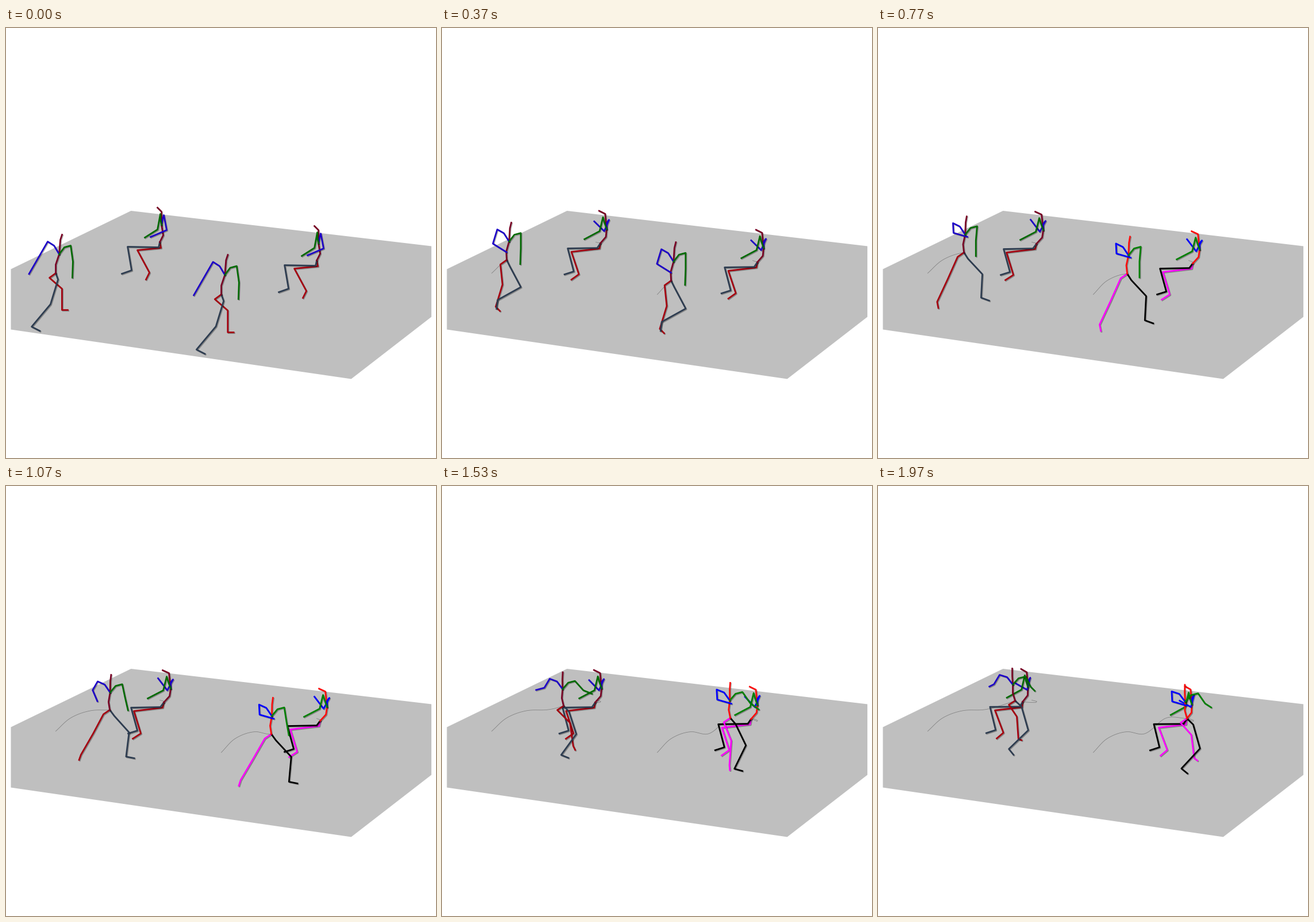
A matplotlib script for the animation above (2.01 s loop, 748x748 px).

```python
import numpy as np
import matplotlib.pyplot as plt
from matplotlib.animation import FuncAnimation
from matplotlib.patheffects import Normal, SimpleLineShadow

SIZE, DPI = 748, 88
PX = 72 / DPI
STEPS = 60          # poses per loop, 30 per second
SWITCH = 15         # pose at which the bright palette sets in
T = np.arange(STEPS)
KEYS = np.array([0, 11, 23, 32, 46, 59.0])

# right leg, left leg, spine, left arm, right arm
DARK = ["#a5000f", "#2d3c50", "#780023", "#1c00c8", "#006a00"]
BRIGHT = ["#ff00ff", "#000000", "#ff0d0d", "#0000ff", "#008000"]


def ease(u):
    u = np.clip(u, 0, 1)
    return u * u * (3 - 2 * u)


def spline(t, values):
    """Cubic Hermite curve through values at the key poses."""
    v = np.asarray(values, float)
    m = np.gradient(v, KEYS)
    i = np.clip(np.searchsorted(KEYS, t, "right") - 1, 0, len(KEYS) - 2)
    h = KEYS[i + 1] - KEYS[i]
    u = (t - KEYS[i]) / h
    return (v[i] + ease(u) * (v[i + 1] - v[i])
            + h * u * (1 - u) * ((1 - u) * m[i] - u * m[i + 1]))


def glide(points):
    return np.stack([spline(T, c) for c in zip(*points)], -1)


def swing(t, lengths, angles):
    """Bone turning through angles (90 is down) as it foreshortens."""
    r = np.interp(t, (0, 23, 59), lengths)
    a = np.radians(spline(t, angles))
    return np.stack([r * np.cos(a), r * np.sin(a)], -1)


def blend(weight, start, end):
    start, end = np.array(start, float), np.array(end, float)
    return start + np.asarray(weight)[:, None] * (end - start)


def chain(base, bones):
    return np.cumsum(np.stack([base, *bones], 1), axis=1)


def assemble(hip, right, left, spine, larm, rarm):
    back = chain(hip, spine)
    neck = back[:, 2]
    return hip, [chain(hip, right), chain(hip, left), back,
                 chain(neck, larm), chain(neck, rarm)]


def walker(path, scale=1, lag=0, arm_stop=STEPS):
    t = T - lag * ease((T - 23) / 25)
    ta = np.minimum(t, arm_stop)
    p = t / (STEPS - 1)
    right = [blend(p, (-11, 8), (-11, 7)),
             swing(t, (29, 42, 25), (41, 84, 114, 118, 45, 56)),
             swing(t, (37, 44, 39), (90, 107, 115, 120, 82, 86)),
             swing(t, (10, 11, 6), (0, 45, 79, 110, 64, 20))]
    left = [blend(p, (4, 11), (11, 10)),
            swing(t, (45, 37, 43), (107, 62, 47, 48, 72, 74)),
            swing(t, (51, 41, 47), (130, 151, 93, 97, 126, 136)),
            swing(t, (16, 15, 13), (27, 97, 20, 11, 22, 51))]
    spine = [blend(p, (0, -15), (-4, -13)), blend(p, (6, -18), (0, -15)),
             blend(p, (2, -25), (-1, -15)), blend(p, (3, -9), (0, -13))]
    larm = [blend(p, (-9, -15), (-10, -13)), blend(p, (-11, -7), (-13, -4)),
            swing(ta, (34, 17, 19), (120, 107, 87, 120, 121, 121)),
            swing(ta, (31, 25, 9), (120, 32, 16, 67, 165, 153))]
    rarm = [blend(p, (9, -12), (10, -11)), blend(p, (11, -3), (12, -3)),
            swing(t, (28, 25, 20), (82, 90, 95, 78, 48, 63)),
            swing(t, (28, 27, 10), (92, 92, 90, 77, 22, 45))]
    limbs = [[scale * bone for bone in limb]
             for limb in (right, left, spine, larm, rarm)]
    return assemble(glide(path), *limbs)


def sitter(path):
    lean = ease(T / 14) - 0.3 * ease((T - 38) / 21)

    def limb(upright, bent):
        return [blend(lean, a, b) for a, b in zip(upright, bent)]

    return assemble(
        glide(path),
        limb([(2, 10), (-41, 4), (21, 39), (-6, 12)],
             [(-2, 9), (-50, 6), (12, 39), (-14, 9)]),
        limb([(-2, 9), (-54, -1), (7, 41), (-17, 6)],
             [(-6, 8), (-51, 1), (11, 40), (-16, 5)]),
        limb([(6, -12), (-3, -18), (0, -23), (-7, -7)],
             [(10, -11), (2, -13), (-3, -27), (-11, -5)]),
        limb([(2, -10), (2, -7), (5, 26), (-28, 12)],
             [(0, -11), (4, -5), (-10, 19), (-16, -21)]),
        limb([(-2, -10), (0, -9), (-5, 27), (-22, 14)],
             [(-4, -11), (-3, -10), (-6, 24), (-27, 14)]))


fig = plt.figure(figsize=(SIZE / DPI, SIZE / DPI), dpi=DPI, facecolor="white")
ax = fig.add_axes([0, 0, 1, 1])
ax.set(xlim=(-0.5, SIZE - 0.5), ylim=(SIZE - 0.5, -0.5))
ax.axis("off")
ax.fill([8, 217, 739.5, 739.5, 600, 8], [419, 317.5, 379, 502, 610, 524],
        color="#bfbfbf", lw=0)

cast = [
    (sitter([(267, 372), (275, 374), (275, 375), (274, 376), (266, 376),
             (251, 375)]), False),
    (walker([(86, 426), (112, 403), (149, 390), (180, 389), (211, 382),
             (238, 373)]), False),
    (sitter([(540, 404), (548, 407), (547, 409), (546, 408), (537, 405),
             (536, 405)]), True),
    (walker([(374, 463), (398, 439), (433, 427), (461, 431), (501, 403),
             (537, 404)], scale=1.03, lag=5, arm_stop=23), True),
]

shadow = [SimpleLineShadow(offset=(1.3 * PX, -1.3 * PX), alpha=0.3), Normal()]
actors = []
for (hip, limbs), changes in cast:
    trail, = ax.plot([], [], color="#808080", lw=0.8 * PX, zorder=2)
    lines = [ax.plot([], [], lw=2.7 * PX, solid_joinstyle="round", zorder=3,
                     path_effects=shadow)[0] for _ in limbs]
    actors.append((hip, limbs, changes, trail, lines))


def update(tick):
    n = min(int((10 * tick + 5) * 0.03), STEPS - 1)
    for hip, limbs, changes, trail, lines in actors:
        trail.set_data(*hip[:n + 1].T)
        palette = BRIGHT if changes and n >= SWITCH else DARK
        for line, pts, color in zip(lines, limbs, palette):
            line.set_data(*pts[n].T)
            line.set_color(color)


# 10 ms ticks carry the 30/40 ms rhythm of the poses
anim = FuncAnimation(fig, update, frames=201, interval=10, repeat=True,
                     repeat_delay=0, cache_frame_data=False)
plt.show()
```
